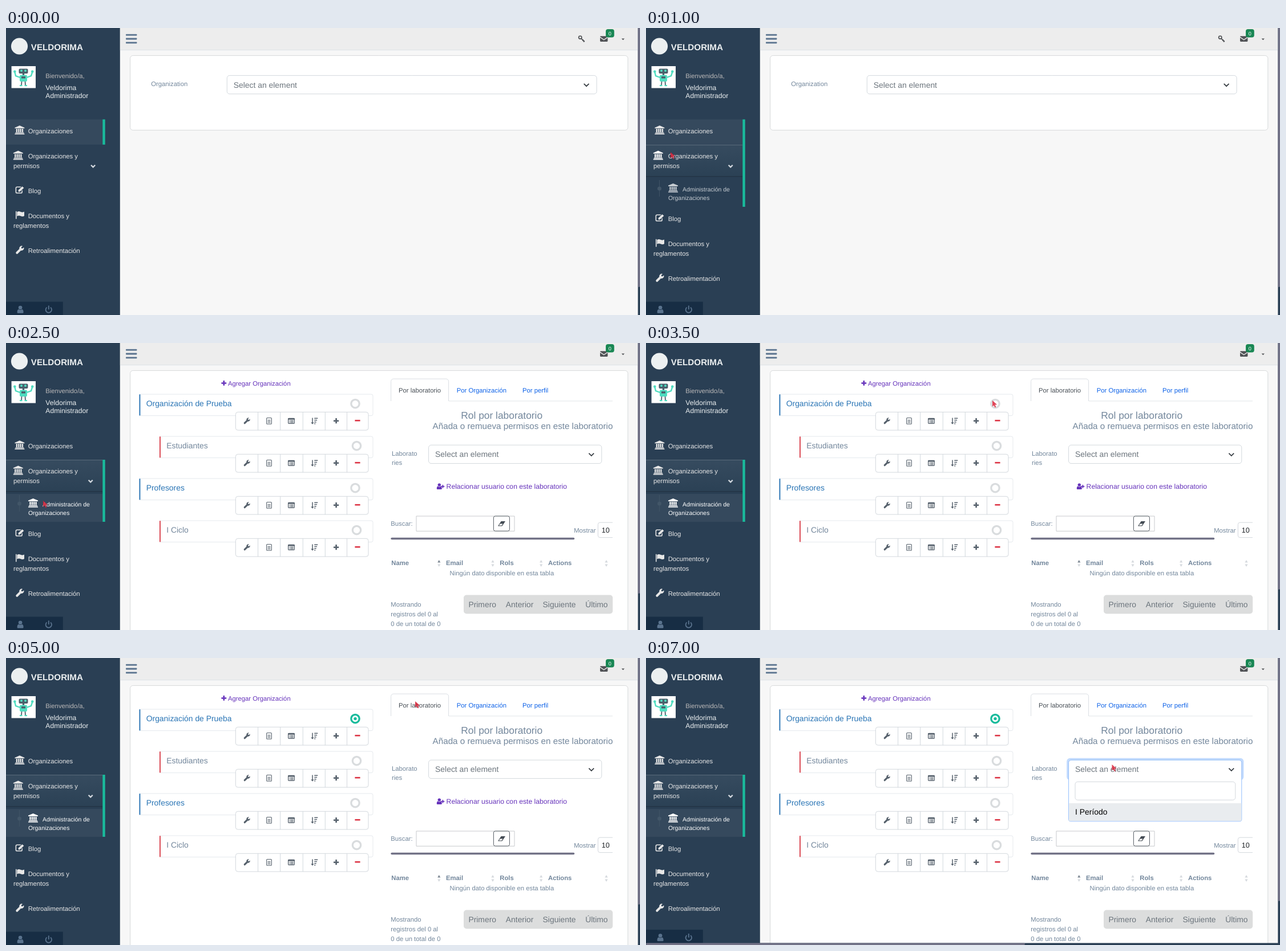
Recreate the animation shown at these times as an HTML page with a canvas. Size 1111 by 504 pixels, loop 8 s.

```html
<!DOCTYPE html>
<html lang="es">
<head>
<meta charset="utf-8">
<title>Panel de organizaciones</title>
<style>
html, body { margin: 0; width: 100%; height: 100%; overflow: hidden; background: #2a3f54; }
canvas { display: block; }
</style>
</head>
<body>
<canvas id="stage" width="1111" height="504"></canvas>
<script>
const ctx = document.getElementById('stage').getContext('2d');
const LOOP = 8000;
const ZOOM = 1111 / 1280; // text is set in page pixels, shapes in stage pixels
const NAVY = '#2a3f54', GREEN = '#1abb9c', SLATE = '#73879c', GREY = '#6c757d';
const LIGHT = '#e7e7e7', LINE = '#ced4da', PURPLE = '#6633bb', THUMB = '#717186';
const BLUE = '#2a75b5', RED = '#d9434f', ICON = '#56616c';

const ICONS = {
  bank: 'M8.5 0L17 3.6V5H0V3.6ZM2.3 5.8h2.3v5.8H2.3ZM5.7 5.8H8v5.8H5.7ZM9 5.8h2.3v5.8H9ZM12.4 5.8h2.3v5.8h-2.3ZM1 12.1h15v1.5H1ZM0 14.2h17v1.6H0Z',
  edit: 'M2.5 1H10L8.7 2.5H2.8Q1.6 2.5 1.6 3.7v6.6Q1.6 11.4 2.8 11.4h6.8q1.2 0 1.2-1.2V8.4l1.5-1.4v3.4Q12.3 13 9.8 13H2.6Q0 13 0 10.3V3.6Q0 1 2.5 1ZM5 9.8V7.2L11.8.6 14.8 3.2 7.8 9.8Z',
  flag: 'M0 0h1.5v13.5H0ZM2.3 1.2Q5.5-.6 8.5 1T15 .8V8.3Q12 10 8.8 8.4T2.3 8.8Z',
  wrench: 'M13.7 2.6L11.2 4.6 9.6 4 9.3 2.4 11.6.3A4.3 4.3 0 0 0 5.9 5.3L.7 10.4A1.9 1.9 0 0 0 3.4 13.2L8.7 8A4.3 4.3 0 0 0 13.7 2.6Z',
  user: 'M5.5 0a3 3 0 0 1 0 6.6a3 3 0 0 1 0-6.6ZM0 11.5Q0 6.5 2.6 6.2Q5.5 8.4 8.4 6.2Q11 6.5 11 11.5Q11 13 9.6 13H1.4Q0 13 0 11.5Z',
  mail: 'M0 1.2Q0 0 1.2 0h11.6Q14 0 14 1.2L7 6ZM0 2.8L7 7.6 14 2.8V9q0 1.2-1.2 1.2H1.2Q0 10.2 0 9Z',
  plus: 'M3.3 0h2.6v3.3h3.3v2.6H5.9v3.3H3.3V5.9H0V3.3h3.3Z',
  minus: 'M0 0h9.2v2.6H0Z',
  cursor: 'M0 0V10.6L2.5 8.4 4.5 12.3 6.4 11.4 4.6 7.6 8.2 7.3Z',
  sort: 'M2 0h1.5v8h1.8L2.7 11.2 0 8h2ZM6 0h6v1.5H6ZM6 3.2h4.8v1.5H6ZM6 6.4h3.4v1.5H6ZM6 9.6h2v1.5H6Z'
};
for (const k in ICONS) ICONS[k] = new Path2D(ICONS[k]);

function rect(x, y, w, h, color) {
  ctx.fillStyle = color;
  ctx.fillRect(x, y, w, h);
}

function box(x, y, w, h, r, fill, stroke, lw = 0.9) {
  ctx.beginPath();
  ctx.roundRect(x, y, w, h, r);
  if (fill) { ctx.fillStyle = fill; ctx.fill(); }
  if (stroke) { ctx.strokeStyle = stroke; ctx.lineWidth = lw; ctx.stroke(); }
}

function text(str, x, y, color, size = 13, weight = 'normal') {
  ctx.save();
  ctx.translate(x, y);
  ctx.scale(ZOOM, ZOOM);
  ctx.font = `${weight} ${size}px "Liberation Sans", Arial, sans-serif`;
  ctx.textRendering = 'geometricPrecision';
  ctx.fillStyle = color;
  ctx.fillText(str, 0, 0);
  ctx.restore();
}

function icon(name, x, y, color, scale = 1) {
  ctx.save();
  ctx.translate(x, y);
  ctx.scale(scale, scale);
  ctx.fillStyle = color;
  ctx.fill(ICONS[name]);
  ctx.restore();
}

function line(color, lw, ...pts) {
  ctx.beginPath();
  for (let i = 0; i < pts.length; i += 2) ctx.lineTo(pts[i], pts[i + 1]);
  ctx.strokeStyle = color;
  ctx.lineWidth = lw;
  ctx.stroke();
}

function poly(color, ...pts) {
  ctx.beginPath();
  for (let i = 0; i < pts.length; i += 2) ctx.lineTo(pts[i], pts[i + 1]);
  ctx.fillStyle = color;
  ctx.fill();
}

function disc(x, y, r, color) {
  ctx.beginPath();
  ctx.arc(x, y, r, 0, 7);
  ctx.fillStyle = color;
  ctx.fill();
}

function ring(x, y, r, color, lw, from = 0, to = Math.PI * 2) {
  ctx.beginPath();
  ctx.arc(x, y, r, from, to);
  ctx.strokeStyle = color;
  ctx.lineWidth = lw;
  ctx.stroke();
}

const chevron = (x, y, w, color, lw) => line(color, lw, x - w, y - w / 2, x, y + w / 2, x + w, y - w / 2);

function select(x, y, w, baseline) {
  box(x, y, w, 32.4, 4.5, '#fff', LINE);
  text('Select an element', x + 11.5, baseline, GREY, 16);
  chevron(x + w - 18, y + 16.6, 4.4, '#343a40', 1.7);
}

function avatar() {
  const teal = '#4fdcc0', dark = '#4b5f6b';
  rect(9.6, 67, 42.4, 38.5, '#fff');
  line(teal, 2.4, 25, 87, 17, 84, 15.5, 78);
  line(teal, 2.4, 36, 87, 44, 84, 46, 78);
  disc(15.3, 76.5, 2.3, teal);
  disc(46.2, 76.5, 2.3, teal);
  box(22.5, 71.5, 16, 8.5, 2, dark);
  disc(27, 75, 2, teal);
  disc(34, 75, 2, teal);
  rect(28.8, 80, 3.4, 3, dark);
  box(24, 82.5, 13, 11.5, 2, teal);
  rect(27, 85, 7, 3.5, dark);
  line(dark, 1.8, 27.5, 94, 27, 101);
  line(dark, 1.8, 33.5, 94, 34, 101);
  rect(24, 100, 4.5, 2.2, teal);
  rect(32.5, 100, 4.5, 2.2, teal);
}

function sidebar(t) {
  const open = t >= 1000, admin = t >= 2500;
  const tint = 'rgba(255,255,255,.05)';
  rect(0, 0, 199.6, 504, NAVY);
  disc(23.5, 32, 14.6, '#ecf0f1');
  text('VELDORIMA', 43.8, 39, '#ecf0f1', 17.5, 'bold');
  avatar();
  text('Bienvenido/a,', 69.3, 88, '#bab8b8');
  text('Veldorima', 69.3, 108.5, '#ecf0f1', 14);
  text('Administrador', 69.3, 123.4, '#ecf0f1', 14);

  if (!admin) rect(0, 160.5, 169.3, 44.3, tint);
  if (open) {
    const g = ctx.createLinearGradient(0, 205, 0, 261);
    g.addColorStop(0, '#364b5f');
    g.addColorStop(1, '#2b4155');
    rect(0, 205, 169.3, 56, g);
    rect(0, 205, 169.3, 0.9, 'rgba(255,255,255,.2)');
    rect(0, 260.4, 169.3, 0.9, 'rgba(0,0,0,.32)');
    if (t >= 2000) rect(0, 265, 169.3, 49, tint);
  }
  const top = admin ? 205 : 160.5;
  rect(169.3, top, 4.4, (open ? 314 : 204.8) - top, GREEN);

  icon('bank', 15.4, 171.3, LIGHT);
  text('Organizaciones', 38.7, 185, LIGHT);
  icon('bank', 12.8, 215.6, open && t < 2000 ? '#fff' : LIGHT);
  text('Organizaciones y', 38.7, 229.3, LIGHT);
  text('permisos', 13, 245.7, LIGHT);
  chevron(open ? 148.2 : 152.6, 242.6, 3.6, '#d5dae0', 2.2);

  if (open) {
    const c = admin ? '#fff' : '#c6ccd2';
    rect(23, 267, 0.9, 29, '#425668');
    disc(23.5, 282, 3.5, '#425668');
    icon('bank', 39, 273, c);
    text('Administración de', 64, 286.7, c, 12);
    text('Organizaciones', 39, 302.4, c, 12);
  }

  const dy = open ? 49 : 0;
  icon('edit', 16.6, 277.6 + dy, LIGHT);
  text('Blog', 38.7, 289.8 + dy, LIGHT);
  icon('flag', 17, 321.8 + dy, LIGHT);
  text('Documentos y', 38.7, 334.2 + dy, LIGHT);
  text('reglamentos', 13, 350.7 + dy, LIGHT);
  icon('wrench', 17.2, 382.6 + dy, LIGHT, 1.03);
  text('Retroalimentación', 38.7, 395 + dy, LIGHT);

  const foot = t >= 7000 ? 477.2 : 480.7;
  rect(0, foot, 99.8, 24, '#172d44');
  icon('user', 19.6, foot + 7, '#5a738e');
  ring(74.8, foot + 14, 5.2, '#5a738e', 1.8, -0.9, Math.PI + 0.9);
  rect(73.9, foot + 6.8, 1.8, 6.8, '#5a738e');
}

function topbar(t) {
  rect(199.6, 0, 908, 504, '#f7f7f7');
  rect(199.6, 0, 908, 38.4, '#ededed');
  rect(199.6, 38.3, 908, 0.9, '#d9dee4');
  for (let i = 0; i < 3; i++) box(210, 10.8 + i * 6.8, 19.4, 2.8, 0.8, '#5a738e');
  if (t < 2500) {
    ring(1006.2, 16.6, 2.6, '#515356', 1.7);
    line('#515356', 1.8, 1008, 18.4, 1013.6, 24);
    line('#515356', 1.5, 1010.2, 22.4, 1012, 20.6);
    line('#515356', 1.5, 1012, 24.4, 1013.8, 22.6);
  }
  icon('mail', 1041, 14.2, '#515356', 0.96);
  box(1051, 2, 14.8, 14.4, 4, '#198754');
  text('0', 1055.8, 12.6, '#fff', 10.5);
  poly('#515356', 1078.6, 18.5, 1084, 18.5, 1081.3, 21.2);
}

function tools(y) {
  box(402.4, y, 232.6, 31.8, 4, '#fff', LINE);
  for (const x of [441.6, 480.6, 520.2, 559.2, 597.5]) rect(x - 0.4, y, 0.9, 31.8, LINE);
  const c = y + 15.4;
  icon('wrench', 416.6, c - 5.4, ICON, 0.8);
  box(456.7, c - 5.2, 8.6, 10.8, 1, null, ICON, 1.1);
  for (let i = 0; i < 3; i++) rect(458.6, c - 1.8 + i * 2.2, 4.8, 1, ICON);
  box(494.6, c - 4.4, 10.8, 9, 1, null, ICON, 1.2);
  rect(494.4, c - 4.6, 11.2, 2.5, ICON);
  for (let i = 0; i < 3; i++) {
    rect(496.2, c - 1 + i * 1.8, 1.2, 1, ICON);
    rect(498.2, c - 1 + i * 1.8, 5.6, 1, ICON);
  }
  icon('sort', 534.3, c - 5.2, ICON);
  icon('plus', 574, c - 4.6, ICON);
  icon('minus', 611.4, c - 1.8, '#dc3545');
}

function node(i, label, checked) {
  const y = 90 + i * 74, child = i % 2;
  const x = child ? 269.5 : 234;
  box(x, y, 643 - x, 37.6, 3, '#fff', '#e3e7eb');
  box(x - 0.5, y, 1.9, 37.6, 1, child ? RED : BLUE);
  text(label, x + 11.7, y + 20.7, child ? SLATE : BLUE, 16);
  const cx = child ? 614.5 : 612, cy = y + 16.6;
  ring(cx, cy, 7.2, checked ? GREEN : '#d9dcde', 3.3);
  if (checked) disc(cx, cy, 2.7, GREEN);
  tools(y + 31.3);
}

function sorter(x, first) {
  poly(first ? '#7c8792' : '#d5d9de', x - 2.6, 385.4, x, 381, x + 2.6, 385.4);
  poly('#d5d9de', x - 2.6, 388.6, x, 393, x + 2.6, 388.6);
}

function roles(t) {
  line('#dee2e6', 0.9, 776, 101.9, 1063, 101.9);
  ctx.beginPath();
  ctx.moveTo(674.6, 102);
  ctx.arcTo(674.6, 63, 690, 63, 4.5);
  ctx.arcTo(775.6, 63, 775.6, 80, 4.5);
  ctx.lineTo(775.6, 102);
  ctx.strokeStyle = '#d6dbe0';
  ctx.lineWidth = 0.9;
  ctx.stroke();
  text('Por laboratorio', 688, 87.2, '#495057');
  text('Por Organización', 789.8, 87.2, '#0d62e8');
  text('Por perfil', 905, 87.2, '#0d62e8');

  text('Rol por laboratorio', 797.3, 133, SLATE, 20);
  text('Añada o remueva permisos en este laboratorio', 747.6, 151.4, SLATE, 17.5);
  text('Laborato', 676, 197.6, SLATE);
  text('ries', 676, 214.4, SLATE);

  icon('user', 754.8, 246.4, PURPLE, 0.82);
  icon('plus', 762.6, 249, PURPLE, 0.62);
  text('Relacionar usuario con este laboratorio', 771.6, 256.3, PURPLE, 14);

  text('Buscar:', 674.3, 321.2, SLATE);
  box(719, 304, 172, 26.4, 0, '#fff', '#c2c5c8');
  box(854.4, 304, 28, 26.2, 3, '#fff', '#444c54');
  poly('#444c54', 862, 321.6, 867.6, 313, 875, 313, 869.4, 321.6);
  poly('#fff', 863.8, 320.6, 865.8, 317.6, 870.4, 317.6, 868.6, 320.6);
  text('Mostrar', 995.2, 332.6, SLATE);
  ctx.save();
  ctx.beginPath();
  ctx.rect(1030, 310, 33, 40);
  ctx.clip();
  box(1037.4, 315.2, 50, 26.4, 3.5, '#fff', LINE);
  text('10', 1043.8, 333, '#212529', 14.5);
  ctx.restore();
  box(674.3, 341.7, 322, 3.6, 1.8, THUMB);

  const heads = [['Name', 675.3, 758.8], ['Email', 771, 853], ['Rols', 865.3, 937.7], ['Actions', 950, 1052]];
  heads.forEach(([label, x, sx], i) => {
    text(label, x, 389.8, SLATE, 13, 'bold');
    sorter(sx, i === 0);
  });
  text('Ningún dato disponible en esta tabla', 777.6, 408, SLATE);

  ['Mostrando', 'registros del 0 al', '0 de un total de 0'].forEach((s, i) => text(s, 674.3, 463 + i * 16.8, SLATE));
  box(802, 442.6, 261.2, 32.8, 5, '#dcdddd');
  text('Primero', 810.4, 463.6, GREY, 16);
  text('Anterior', 875.8, 463.6, GREY, 16);
  text('Siguiente', 940.6, 463.6, GREY, 16);
  text('Último', 1015.2, 463.6, GREY, 16);

  if (t >= 7000) box(737.2, 175.8, 310.2, 38.8, 6, '#c2dbfe');
  select(740.6, 179.2, 303.2, 200);
  if (t >= 7000) {
    box(740.6, 179.2, 303.2, 107.6, [4.5, 4.5, 3, 3], '#fff', '#86b7fe');
    text('Select an element', 752.1, 200, GREY, 16);
    chevron(1025.8, 195.8, 4.4, '#343a40', 1.7);
    box(752, 217.4, 280.8, 32, 4.5, '#fff', LINE);
    rect(741.1, 255, 302.2, 31.2, '#e9ecef');
    text('I Período', 752.1, 275.3, '#000', 16);
  }
}

function content(t) {
  const first = t < 2500;
  box(217.6, 48.4, 872.2, first ? 131 : 480, 5, '#fff', '#d3d5d7');
  if (first) {
    text('Organization', 254.2, 102, SLATE);
    select(387.3, 83.4, 647.8, 104.8);
    return;
  }
  icon('plus', 377.4, 66, PURPLE, 0.96);
  text('Agregar Organización', 388.9, 75, PURPLE);
  ['Organización de Prueba', 'Estudiantes', 'Profesores', 'I Ciclo']
    .forEach((label, i) => node(i, label, i === 0 && t >= 4000));
  roles(t);
}

// value of the last entry whose time has come
const at = (list, t) => list.filter(e => e[0] <= t).pop();

const POINTER = [[500, 43, 218], [2000, 65, 277], [3500, 607, 101], [5000, 717, 76], [6500, 816.5, 187]];
const THUMB_END = [[0, 455], [2000, 449], [2500, 440], [3500, 433], [7000, 427]];

function scrollbars(t) {
  rect(1107.5, 0, 3.5, 504, NAVY);
  box(1107.5, -4, 3.5, at(THUMB_END, t)[1] + 4, 1.7, THUMB);
  if (t < 7000) return;
  rect(0, 500.5, 1111, 3.5, NAVY);
  box(0, 500.5, 664, 3.5, 1.7, THUMB);
}

function draw() {
  const t = performance.now() % LOOP;
  topbar(t);
  content(t);
  sidebar(t);
  scrollbars(t);
  const p = at(POINTER, t);
  if (p) icon('cursor', p[1], p[2], 'rgba(217,30,52,.82)');
  requestAnimationFrame(draw);
}
draw();
</script>
</body>
</html>
```
